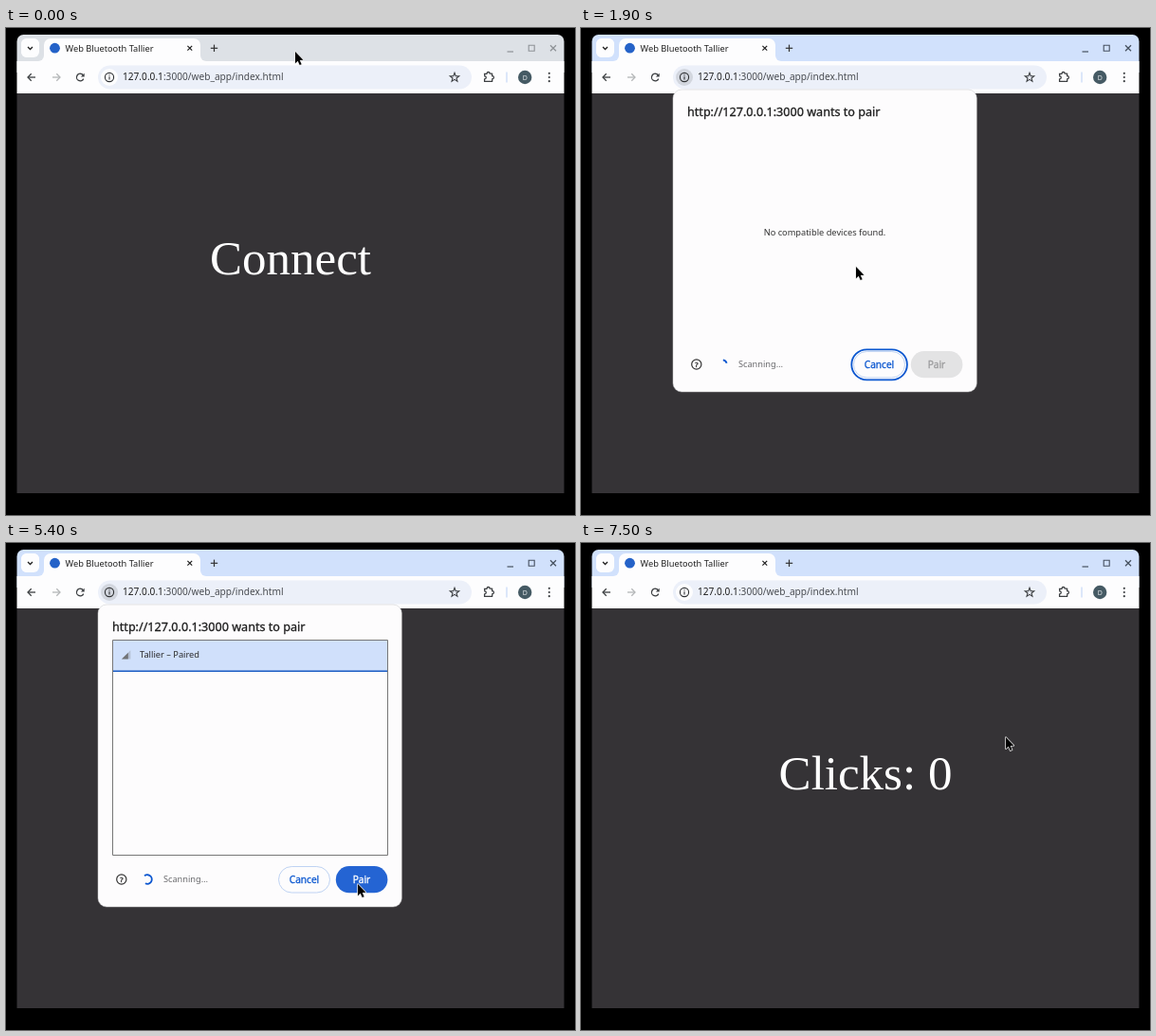
Recreate the animation shown at these times as an HTML page with a canvas. Size 600x514 px, loop 8000 ms.

```html
<!DOCTYPE html>
<html lang="en">
<head>
<meta charset="utf-8">
<title>Web Bluetooth pairing</title>
<style>
html, body { margin: 0; width: 100%; height: 100%; overflow: hidden; background: #000; }
canvas { display: block; width: 600px; height: 514px; }
</style>
</head>
<body>
<canvas id="stage"></canvas>
<script>
const LOOP = 8000, STEP = 100;
const SANS = '"Noto Sans", "Open Sans", sans-serif';
const SERIF = '"Liberation Serif", serif';
const BLUE = '#0b57d0', INK = '#1f1f1f', PAGE = '#353336';

const canvas = document.getElementById('stage');
const ratio = window.devicePixelRatio || 1;
canvas.width = 600 * ratio;
canvas.height = 514 * ratio;
const ctx = canvas.getContext('2d');

const clamp = v => Math.min(1, Math.max(0, v));
const smooth = v => v * v * (3 - 2 * v);

function rect(x, y, w, h, r, fill, stroke, line = 1) {
  ctx.beginPath();
  ctx.roundRect(x, y, w, h, r);
  paint(fill, stroke, line);
}

function circle(x, y, r, fill, stroke, line = 1) {
  ctx.beginPath();
  ctx.arc(x, y, r, 0, Math.PI * 2);
  paint(fill, stroke, line);
}

function path(points, fill, stroke, line = 1, close = true) {
  ctx.beginPath();
  points.forEach(([x, y]) => ctx.lineTo(x, y));
  if (close) ctx.closePath();
  paint(fill, stroke, line);
}

function paint(fill, stroke, line) {
  if (fill) { ctx.fillStyle = fill; ctx.fill(); }
  if (stroke) { ctx.strokeStyle = stroke; ctx.lineWidth = line; ctx.stroke(); }
}

const stroke = (points, color, line) => path(points, null, color, line, false);

function cross(x, y, r, color, line) {
  stroke([[x - r, y - r], [x + r, y + r]], color, line);
  stroke([[x + r, y - r], [x - r, y + r]], color, line);
}

// "bold" thickens the glyphs slightly to give a medium weight.
function text(str, x, y, size, color, { align = 'left', family = SANS, bold = 0 } = {}) {
  ctx.font = `${size}px ${family}`;
  ctx.textAlign = align;
  ctx.fillStyle = color;
  ctx.fillText(str, x, y);
  if (bold) {
    ctx.strokeStyle = color;
    ctx.lineWidth = bold;
    ctx.strokeText(str, x, y);
  }
  return ctx.measureText(str).width;
}

function drawTabs(active) {
  const strip = active ? '#d1e1fc' : '#dde1e6';
  rect(11.5, 7, 577, 40, [7, 7, 0, 0], strip);
  rect(16, 11, 19, 20, 6, '#fdfdfe');
  stroke([[23, 20], [25.5, 22.5], [28, 20]], INK, 1.3);

  rect(34, 29, 177, 6, 0, '#fdfdfe');
  rect(28, 23, 12, 12, 6, strip);
  rect(205, 23, 12, 12, 6, strip);
  rect(28, 29, 6, 6, 0, strip);
  rect(211, 29, 6, 6, 0, strip);
  rect(40, 11, 165, 25, [7, 7, 0, 0], '#fdfdfe');
  rect(16, 11, 19, 20, 6, '#fdfdfe');
  stroke([[23, 20], [25.5, 22.5], [28, 20]], INK, 1.3);

  circle(51.5, 21.2, 5.4, '#2462c8');
  text('Web Bluetooth Tallier', 62.5, 24.7, 9.27, INK);
  cross(193.8, 21.3, 2.4, INK, 1.2);
  stroke([[215.8, 21.3], [223.2, 21.3]], '#333', 1.2);
  stroke([[219.5, 17.6], [219.5, 25]], '#333', 1.2);

  const buttons = active ? '#46505f' : '#8e9297';
  stroke([[528.5, 25], [535, 25]], buttons, 1.2);
  rect(551.2, 18.2, 6, 6, 0, null, buttons, 1.1);
  cross(577, 21.3, 3, buttons, 1.3);
}

function arrow(x, dir, color) {
  stroke([[x - 4 * dir, 52], [x + 4 * dir, 52]], color, 1.3);
  stroke([[x + .3 * dir, 48.2], [x + 4 * dir, 52], [x + .3 * dir, 55.8]], color, 1.3);
}

function drawToolbar(pressed) {
  rect(11.5, 35, 577, 34, 0, '#fdfdfe');
  arrow(27, -1, '#3c3f42');
  arrow(53, 1, '#b4b6b8');

  ctx.beginPath();
  ctx.arc(78.3, 52, 3.8, .45, Math.PI * 1.8);
  paint(null, '#3c3f42', 1.3);
  path([[82.7, 47.7], [82.7, 51.5], [78.9, 51.5]], '#3c3f42');

  rect(97, 39.5, 394, 25, 12.5, '#ecf0f9');
  circle(109, 52, 9, pressed ? '#d2d6de' : '#fdfdfe');
  circle(109, 52, 4.6, null, '#2e3033', 1.1);
  stroke([[109, 51.3], [109, 54.6]], '#2e3033', 1.1);
  stroke([[109, 49.2], [109, 50.3]], '#2e3033', 1.1);

  const host = text('127.0.0.1', 123, 55.4, 10.15, INK);
  text(':3000/web_app/index.html', 123 + host, 55.4, 10.15, '#484b50');

  const star = Array.from({ length: 10 }, (_, i) => {
    const r = i % 2 ? 2.1 : 5, a = i * Math.PI / 5 - Math.PI / 2;
    return [473 + r * Math.cos(a), 52.3 + r * Math.sin(a)];
  });
  path(star, null, '#3c3f42', 1.1);

  // Extensions piece
  ctx.beginPath();
  ctx.moveTo(504.6, 48.3);
  ctx.lineTo(507, 48.3);
  ctx.arc(508.6, 48, 1.5, Math.PI, 0);
  ctx.lineTo(512.6, 48.3);
  ctx.lineTo(512.6, 50.7);
  ctx.arc(512.9, 52.2, 1.5, -Math.PI / 2, Math.PI / 2);
  ctx.lineTo(512.6, 56.4);
  ctx.lineTo(504.6, 56.4);
  ctx.lineTo(504.6, 53.9);
  ctx.arc(504.8, 52.3, 1.5, Math.PI / 2, -Math.PI / 2, true);
  ctx.closePath();
  paint(null, '#3c3f42', 1.3);

  stroke([[528, 46.5], [528, 57.5]], '#cbdcf7', 1.3);
  circle(547.2, 52, 7.2, '#455a64');
  text('D', 547.2, 54.6, 7, '#e6eaec', { align: 'center' });
  [47.8, 52, 56.2].forEach(y => circle(572.8, y, 1.1, '#3c3f42'));
}

function bezierEase(p) {
  let lo = 0, hi = 1, u = p;
  for (let i = 0; i < 20; i++) {
    u = (lo + hi) / 2;
    const x = 1.2 * u * (1 - u) ** 2 + .6 * u * u * (1 - u) + u ** 3;
    if (x < p) lo = u; else hi = u;
  }
  return u * u * (3 - 2 * u);
}

function drawSpinner(t) {
  const time = Math.max(0, 325 + .98 * (t - 1900));
  const phase = Math.floor(time / 666);
  let sweep = 270 * bezierEase(time / 666 - phase);
  if (phase % 2 === 0) sweep = Math.min(-5, sweep - 270);
  const start = 270 + time / 1568 * 360 + Math.floor(phase / 2) * 270;
  const from = Math.min(start, start + sweep), to = Math.max(start, start + sweep);
  ctx.beginPath();
  ctx.arc(149, 355, 4.8, from * Math.PI / 180, to * Math.PI / 180);
  paint(null, BLUE, 1.8);
}

function drawList(selected) {
  rect(112.5, 102.5, 290, 227, 0, '#fdfcfd', '#777', 1);
  if (selected) {
    rect(113, 103, 289, 32, 0, '#d0e0fb');
    rect(113, 134.5, 289, 1.5, 0, '#1b5cc4');
  }
  path([[122, 122.5], [131.3, 122.5], [131.3, 113.2]], selected ? '#b3bfd3' : '#cfcfcf');
  path([[122, 122.5], [128.8, 122.5], [128.8, 115.7]], '#717376');
  text('Tallier – Paired', 141, 121.3, 9.27, '#2b2b2d');
}

function drawDialog(t) {
  const shown = t < 4000 ? clamp((t - 1636) / 200) : 1 - clamp((t - 6036) / 200);
  if (!shown) return;
  const scale = .95 + .05 * shown;
  const selected = t >= 4000;

  // Fade as one layer, so overlapping parts keep their own colours.
  const layer = shown < 1 ? document.createElement('canvas') : null;
  const main = ctx;
  if (layer) {
    layer.width = canvas.width;
    layer.height = canvas.height;
    ctxSwap(layer.getContext('2d'));
    pen.setTransform(ratio, 0, 0, ratio, 0, 0);
  }
  pen.save();
  pen.translate(257, 224.5);
  pen.scale(scale, scale);
  pen.translate(-257, -224.5);
  withPen(() => dialogBody(t, selected));
  pen.restore();
  if (layer) {
    pen = main;
    main.save();
    main.globalAlpha = shown;
    main.drawImage(layer, 0, 0, 600, 514);
    main.restore();
  }
}

let pen = ctx;
function ctxSwap(next) { pen = next; }

// Routes the helpers to the current layer by drawing opaque on it.
function withPen(draw) {
  if (pen === ctx) { draw(); return; }
  const m = pen.getTransform();
  ctx.save();
  const keep = document.createElement('canvas');
  keep.width = canvas.width;
  keep.height = canvas.height;
  keep.getContext('2d').drawImage(canvas, 0, 0);
  ctx.setTransform(1, 0, 0, 1, 0, 0);
  ctx.clearRect(0, 0, canvas.width, canvas.height);
  ctx.setTransform(m);
  draw();
  ctx.setTransform(1, 0, 0, 1, 0, 0);
  pen.setTransform(1, 0, 0, 1, 0, 0);
  pen.drawImage(canvas, 0, 0);
  ctx.clearRect(0, 0, canvas.width, canvas.height);
  ctx.drawImage(keep, 0, 0);
  ctx.restore();
}

function dialogBody(t, selected) {
  rect(97, 65, 320.3, 319, 9, '#fdfcfd', '#c9c9cb', .5);
  text('http://127.0.0.1:3000 wants to pair', 112, 92.5, 12.6, INK, { bold: .3 });

  if (t >= 2200) drawList(selected);
  else text('No compatible devices found.', 257, 218.6, 9.25, '#333', { align: 'center' });

  circle(121.8, 355, 5.1, null, '#333', 1.2);
  text('?', 121.8, 357.8, 7.5, '#333', { align: 'center', bold: .4 });
  drawSpinner(t);
  text('Scanning…', 166, 358.4, 9.2, '#6b6b6e');

  rect(287.5, 341.5, 54, 27.5, 13.75, null, '#bfd3f3', 1);
  if (!selected) rect(285.3, 339.3, 58.6, 32, 16, null, BLUE, 1.8);
  text('Cancel', 314.5, 358.7, 10.1, BLUE, { align: 'center', bold: .3 });

  const pairFill = !selected ? '#e3e3e4' : t >= 4800 ? '#2464d3' : BLUE;
  rect(347.8, 341, 54.6, 28.3, 14.1, pairFill);
  text('Pair', 375, 358.7, 10.1, selected ? '#fff' : '#9b9b9d', { align: 'center', bold: .3 });
}

// time, x, y of the pointer tip
const route = [
  [0, 305, 25], [100, 305, 25], [900, 297, 260], [1300, 290, 252], [2400, 290, 252],
  [3100, 185, 116], [3700, 181, 112], [4200, 181, 112], [4900, 371, 353], [5300, 371, 360],
  [5700, 371, 360], [6000, 370, 352], [6150, 370, 352], [6700, 448, 205], [LOOP, 448, 205]
];

function drawPointer(t) {
  const i = route.findIndex(k => k[0] > t);
  const [t0, x0, y0] = route[i - 1], [t1, x1, y1] = route[i];
  const p = smooth((t - t0) / (t1 - t0));
  const x = x0 + (x1 - x0) * p, y = y0 + (y1 - y0) * p;
  const shape = [[0, 0], [0, 12.2], [2.7, 9.8], [4.7, 14.1], [6.6, 13.2], [4.7, 9], [8.4, 8.7]];
  const points = shape.map(([a, b]) => [x + a, y + b]);
  ctx.lineJoin = 'round';
  path(points, null, '#e8e8e8', 1.5);
  path(points, '#000');
  ctx.lineJoin = 'miter';
}

function draw(t) {
  ctx.setTransform(ratio, 0, 0, ratio, 0, 0);
  rect(0, 0, 600, 514, 0, '#000');
  drawTabs(t >= 1500);
  drawToolbar(t >= 1900 && t < 6200);
  rect(11.5, 69, 577, 422, 0, PAGE);
  const label = t < 7500 ? 'Connect' : 'Clicks: 0';
  text(label, 300, 260, 51, '#fff', { align: 'center', family: SERIF });
  drawDialog(t);
  drawPointer(t);
}

const begin = performance.now();
function tick() {
  const t = (performance.now() - begin) % LOOP;
  draw(Math.min(LOOP - STEP, Math.floor((t + 10) / STEP) * STEP));
  requestAnimationFrame(tick);
}
tick();
</script>
</body>
</html>
```
